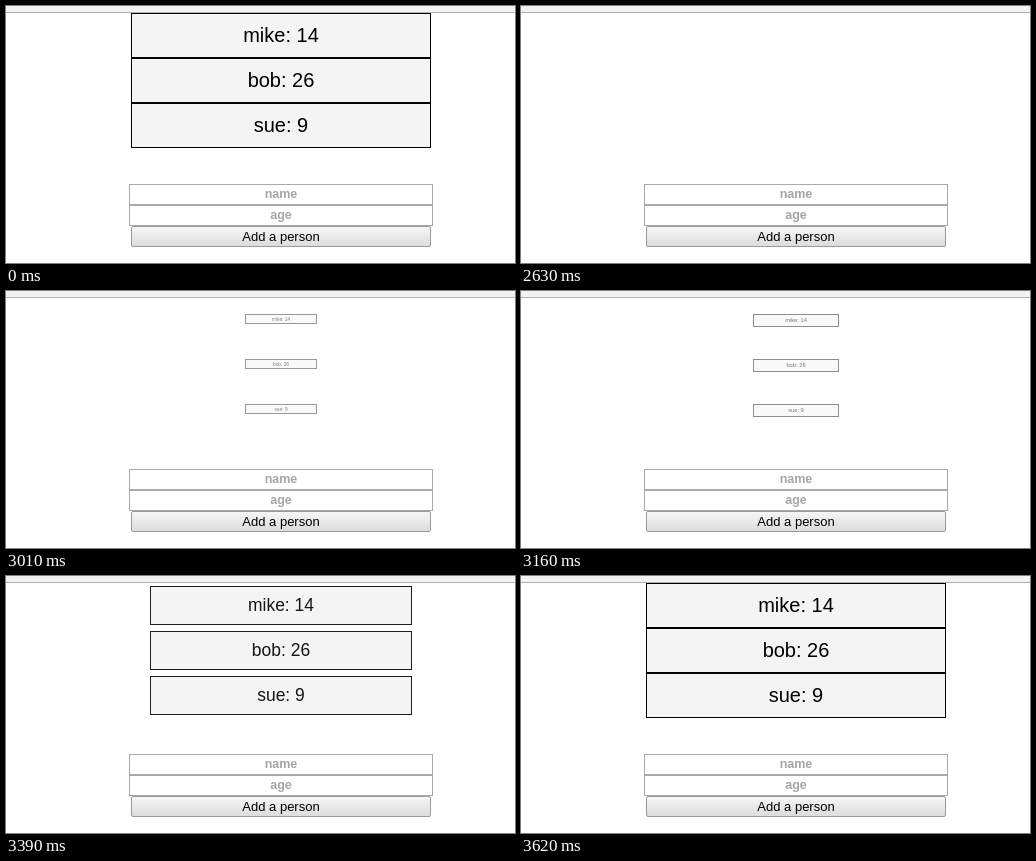
Animation, 509 px wide and 257 px high, one loop 5490 ms. Source, as an HTML page:

```html
<!DOCTYPE html>
<html lang="en">
<head>
<meta charset="utf-8">
<title>People list</title>
<style>
  html, body { margin: 0; width: 100%; height: 100%; overflow: hidden; background: #fff; }
  body { position: relative; font-family: Arial, "Liberation Sans", sans-serif; color: #000; }
  .bar { position: absolute; left: 0; right: 0; top: 0; height: 6px; background: #f2f2f2; border-bottom: 1px solid #b0b0b0; }
  .page { position: absolute; left: 0; right: 0; top: 7px; bottom: 0; overflow: hidden; }
  .item { position: absolute; left: 125px; width: 300px; height: 45px; }
  .frame { position: absolute; box-sizing: border-box; border: 1px solid #000; background: #f4f4f4; }
  .label { position: absolute; inset: 0; font-size: 20px; line-height: 45px; text-align: center; white-space: pre; }
  .field, .button { position: absolute; box-sizing: border-box; height: 21px; line-height: 19px; text-align: center; }
  .field { left: 123px; width: 304px; border: 1px solid #a9a9a9; background: #fff; color: #a3a6a3; font-size: 12.5px; font-weight: bold; }
  .button { left: 125px; width: 300px; top: 213px; border: 1px solid #999; border-radius: 2px; background: linear-gradient(#f6f6f6, #dcdcdc); font-size: 13px; }
</style>
</head>
<body>
<div class="bar"></div>
<div class="page" id="page">
  <div class="field" style="top:171px">name</div>
  <div class="field" style="top:192px">age</div>
  <div class="button">Add a person</div>
</div>
<script>
const LOOP = 5490, HIDE = 2380, SHOW = 2630;
const WIDTH = 300, HEIGHT = 45;
const page = document.getElementById('page');

// [time in the loop, progress of the entrance in ms]
const STEPS = [
  [2630, 0], [2710, 80], [2790, 156], [2870, 240], [2940, 310], [3010, 383], [3090, 458],
  [3160, 533], [3240, 610], [3320, 686], [3390, 765], [3470, 852], [3560, 930], [3620, 1000]
];

// Entrance poses, eased one after the other
const POSES = [
  { y: -HEIGHT, scale: 0, opacity: 0 },
  { y: 0, scale: 0.25, opacity: 0.5 },
  { y: 0, scale: 1, opacity: 1 }
];

function add(parent, className, text = '') {
  const el = document.createElement('div');
  el.className = className;
  el.textContent = text;
  parent.append(el);
  return el;
}

const items = ['mike: 14', 'bob: 26', 'sue: 9'].map((text, i) => {
  const box = add(page, 'item');
  box.style.top = i * HEIGHT + 'px';
  return { box, frame: add(box, 'frame'), label: add(box, 'label', text) };
});

// The CSS "ease" curve: cubic-bezier(.25, .1, .25, 1)
function ease(x) {
  if (x <= 0 || x >= 1) return Math.min(1, Math.max(0, x));
  let low = 0, high = 1, s = 0.5;
  for (let i = 0; i < 24; i++) {
    s = (low + high) / 2;
    if (0.75 * s * (1 - s) + s ** 3 < x) low = s; else high = s;
  }
  return 0.3 * s * (1 - s) ** 2 + 3 * s * s * (1 - s) + s ** 3;
}

function poseAt(ms) {
  const part = ms < 500 ? 0 : 1;
  const k = ease(ms / 500 - part);
  const from = POSES[part], to = POSES[part + 1];
  const mix = key => from[key] + (to[key] - from[key]) * k;
  return { y: mix('y'), scale: mix('scale'), opacity: mix('opacity') };
}

function place({ box, frame, label }, { y, scale, opacity }) {
  const left = Math.round((WIDTH - WIDTH * scale) / 2);
  const right = Math.round((WIDTH + WIDTH * scale) / 2);
  const top = Math.round(y + (HEIGHT - HEIGHT * scale) / 2);
  const bottom = Math.round(y + (HEIGHT + HEIGHT * scale) / 2);
  box.style.opacity = opacity;
  box.style.visibility = scale > 0 ? 'inherit' : 'hidden';
  Object.assign(frame.style, {
    left: left + 'px',
    top: top + 'px',
    width: right - left + 'px',
    height: bottom - top + 'px',
    borderColor: `rgba(0, 0, 0, ${0.75 + 0.25 * scale})`
  });
  label.style.transform = scale === 1 ? 'none' : `translateY(${y}px) scale(${scale})`;
}

function draw(time) {
  let progress = 1000;
  if (time >= SHOW) {
    for (const [start, ms] of STEPS) if (time >= start) progress = ms;
  }
  page.style.visibility = time >= HIDE && time < SHOW ? 'hidden' : 'visible';
  const pose = poseAt(progress);
  items.forEach(item => place(item, pose));
}

const began = performance.now();
function tick() {
  draw((performance.now() - began) % LOOP);
  requestAnimationFrame(tick);
}
tick();
</script>
</body>
</html>
```
